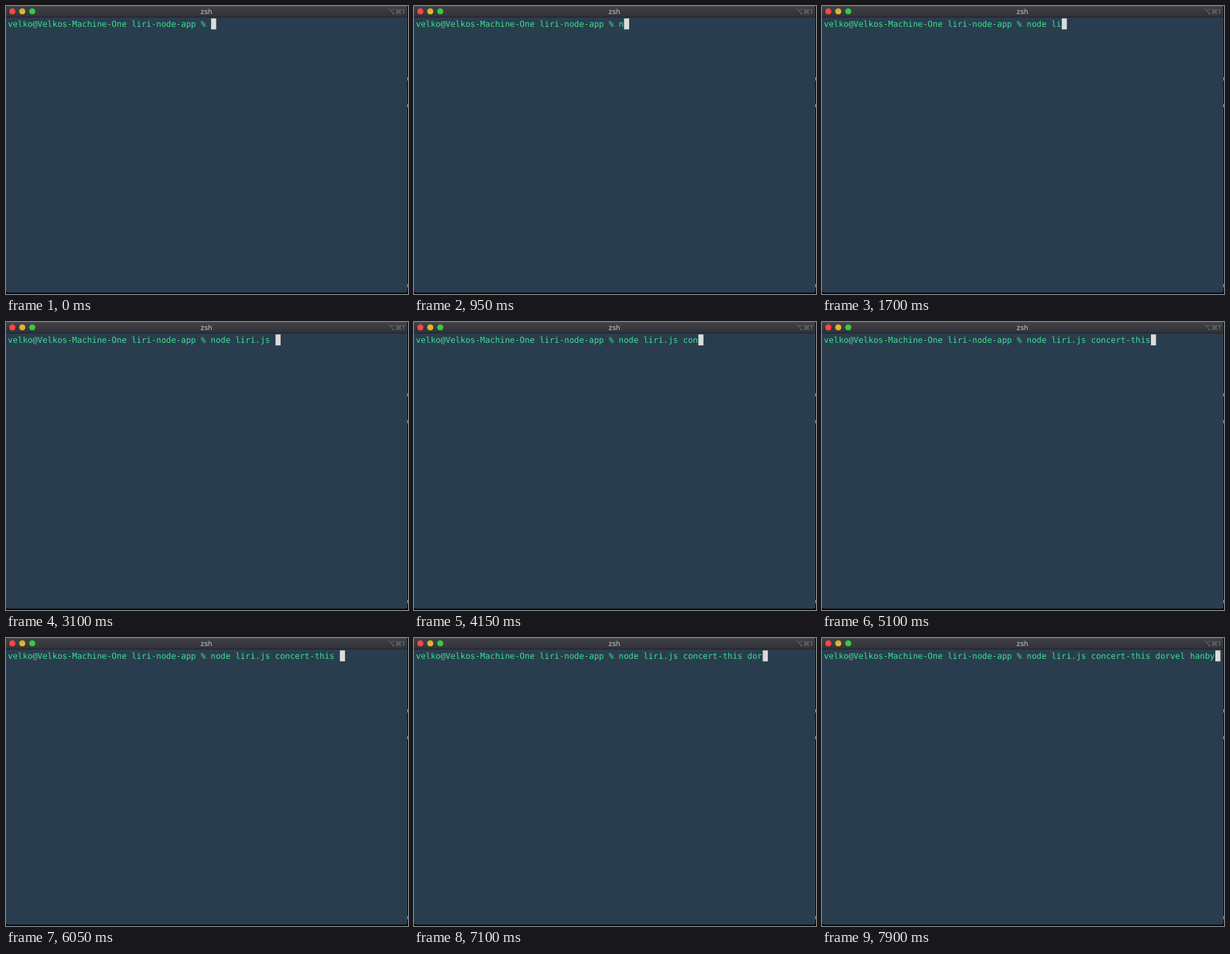
An HTML page for the animation above (8000 ms loop, 600x429 px).

```html
<!DOCTYPE html>
<html lang="en">
<head>
<meta charset="utf-8">
<title>Terminal</title>
<style>
  html, body { margin: 0; width: 100%; height: 100%; overflow: hidden; background: #05070a; }
  svg { display: block; width: 100vw; height: 100vh; }
  text { white-space: pre; text-rendering: geometricPrecision; }
  .line { font: 12.28px "DejaVu Sans Mono", monospace; fill: #3ce08f; }
  .title { font: 10.5px Inter, sans-serif; fill: #c9cacc; text-anchor: middle; }
  .hint { font: 10px Inter, "DejaVu Sans", sans-serif; fill: #75787c; text-anchor: end; }
</style>
</head>
<body>
<svg viewBox="0 0 600 429" preserveAspectRatio="none">
  <defs>
    <linearGradient id="bar" x2="0" y2="1">
      <stop stop-color="#404247"/>
      <stop offset="1" stop-color="#303237"/>
    </linearGradient>
  </defs>
  <rect width="600" height="429" fill="#05070a"/>
  <path d="M0 16H599V424Q599 427 596 427H3Q0 427 0 424Z" fill="#2a3d4f"/>
  <path d="M0 3Q0 0 3 0H596Q599 0 599 3V16H0Z" fill="url(#bar)"/>
  <path d="M0 .5H599" stroke="#55575b" stroke-opacity=".6"/>
  <path d="M0 16.5H599" stroke="#1b222b"/>
  <path d="M599.5 106v5M599.5 146v5M599.5 414v5" stroke="#8d9399"/>
  <circle cx="9.5" cy="8" r="4.6" fill="#fc4645"/>
  <circle cx="24.3" cy="8" r="4.6" fill="#dfb428"/>
  <circle cx="39.2" cy="8" r="4.6" fill="#35cb3b"/>
  <text class="title" x="299" y="12">zsh</text>
  <text class="hint" x="595" y="12">⌥⌘1</text>
  <text class="line" id="line" x="2.8" y="31"></text>
  <rect id="cursor" y="18.5" width="7.6" height="16.3" fill="#dcdcdc"/>
</svg>
<script>
const LOOP = 8000, LEFT = 3, PITCH = 7.393;
const PROMPT = "velko@Velkos-Machine-One liri-node-app % ";

// Each burst of typing: text and the moment of every keystroke in ms.
const BURSTS = [
  ["node ", [900, 1000, 1100, 1200, 1300]],
  ["liri.js ", [1500, 1650, 1750, 1850, 1950, 2050, 2150, 2250]],
  ["con", [3750, 3900, 4050]],
  ["cert", [4300, 4400, 4500, 4600]],
  ["-this", [4800, 4850, 4950, 5000, 5100]],
  [" ", [5500]],
  ["dorvel ha", [6850, 6950, 7050, 7150, 7250, 7350, 7450, 7550, 7600]],
  ["nby", [7700, 7750, 7850]]
];
const command = BURSTS.map(([text]) => text).join("");
const keyTimes = BURSTS.flatMap(([, times]) => times);
const line = document.getElementById("line");
const cursor = document.getElementById("cursor");
let shown = -1;

function draw(ms) {
  const typed = keyTimes.filter(t => t <= ms).length;
  if (typed === shown) return;
  shown = typed;
  line.textContent = PROMPT + command.slice(0, typed);
  cursor.setAttribute("x", LEFT + (PROMPT.length + typed) * PITCH);
}

const start = performance.now();
function tick() {
  draw((performance.now() - start) % LOOP);
  requestAnimationFrame(tick);
}
tick();
</script>
</body>
</html>
```
